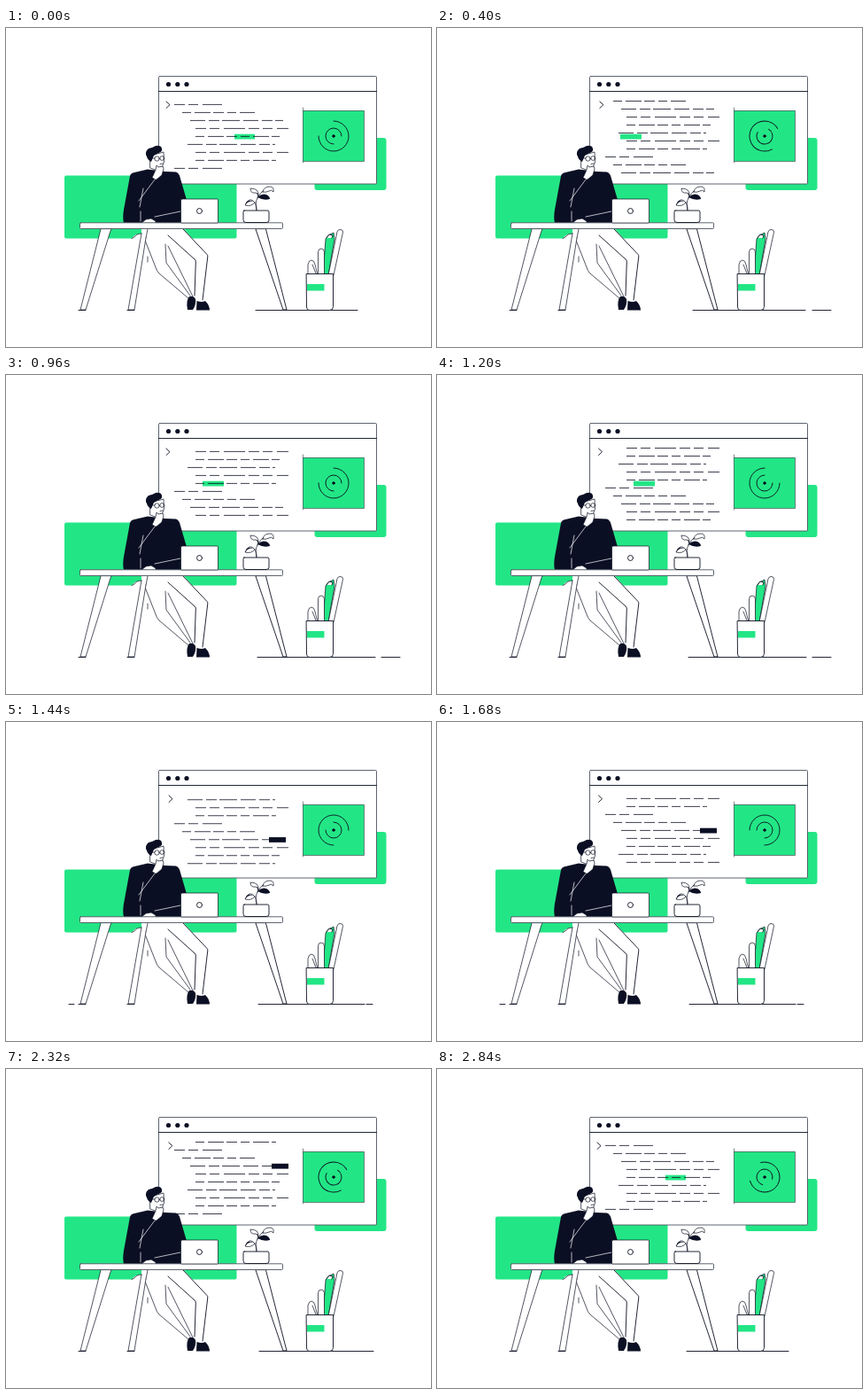
An HTML page that plays this animation: 480x360 px, repeating every 2.88 s.

```html
<!DOCTYPE html>
<html lang="en">
<head>
<meta charset="utf-8">
<title>Thinking at the desk</title>
<style>
  html, body { margin: 0; width: 100%; height: 100%; overflow: hidden; background: #fff; }
  svg { display: block; width: 100%; height: 100%; }
  .line { fill: none; stroke: #0b0f20; stroke-width: .9; stroke-linecap: round; stroke-linejoin: round; }
  .paper { fill: #fff; }
  .green { fill: #22e685; }
  .ink { fill: #0b0f24; }
  .thin { stroke-width: .7; }
  .soft { stroke: #4c5360; }
  .light { stroke: #fff; }
  #code { stroke-width: .8; stroke-linecap: butt; }
</style>
</head>
<body>
<svg viewBox="0 0 480 360">
  <clipPath id="page"><rect x="180" y="80" width="150" height="85"/></clipPath>

  <rect class="green" x="66" y="166.500" width="194.500" height="71" rx="2"/>
  <rect class="green" x="348.500" y="124" width="81" height="59" rx="3"/>

  <!-- Browser window -->
  <rect class="line paper soft" x="172.500" y="54.500" width="246" height="121.500" rx="1"/>
  <path class="line" d="M172.500 71.500h246"/>
  <g class="ink">
    <circle cx="183.500" cy="63.500" r="2.600"/>
    <circle cx="193.800" cy="63.500" r="2.600"/>
    <circle cx="204" cy="63.500" r="2.600"/>
  </g>
  <path id="chevron" class="line" d="M0 83l4 3.700-4 3.800"/>
  <g clip-path="url(#page)">
    <rect id="marker" height="5.800"/>
    <g id="code" class="line"></g>
  </g>

  <!-- Picture with turning arcs -->
  <rect class="green" x="335" y="93" width="69.500" height="57.500"/>
  <path class="line thin soft" d="M335.500 90v62M335.500 150.500h69V93.500h-69"/>
  <g class="line" transform="translate(370 122)">
    <path id="outerArc" d="M0-17A17 17 0 1 1-17 0"/>
    <path id="innerArc" d="M0-9A9 9 0 1 1-9 0"/>
    <circle class="ink" r="1.300"/>
  </g>

  <!-- Trousers and shoes -->
  <path class="paper" d="M142 238Q145 232 153 232V226H200L228 257 222 308H213L214 262 187 238H182L209 303 205 306 170 275 157 240Z"/>
  <path class="line" d="M200 227L227 255.500Q228 256.500 227.800 258L222 307M183 234L213 261Q214.500 262 214.300 264L213 302"/>
  <path class="line thin" d="M156 237L169 270Q170 274 173 277L206 305M180 244L181 265 208 302M183 246L211 303M160 258v6"/>
  <path class="ink" d="M207 303q5-1 7 3 1 6-3 12h-6q-2-10 2-15ZM215.500 308q6 2 9.500 0 5 5 5 10.500h-15Z"/>

  <!-- Table -->
  <path class="line paper thin" d="M107 227L84 318h6l28-89 1-2ZM158 237L145 318h-7L153 232"/>
  <path class="line thin" d="M158 237l2-10M153 232q-6 0-8 4l-3 1.500"/>
  <path class="line paper" d="M282 227l31 91h4L293.500 227Z"/>
  <path class="line" d="M82 318.500h8M137 318.500h8"/>
  <path id="ground" class="line"/>

  <!-- Man -->
  <path class="ink" d="M140 167Q141 163.500 145 163L160 159.500 180 162 192 162.500Q196 164 197 170L204 194 198 220H133Q131.500 214 133 205Z"/>
  <path class="line thin paper" d="M163 144L178 140 178.500 151 176 158 171 161 163 158Z"/>
  <path class="ink" d="M164 151q-4-2-5-6-3-5 2-9 5-1 8-3 6-1 7 3 1 4-4 5l-5 3Z"/>
  <g class="line thin">
    <circle cx="170.500" cy="147.500" r="2.700"/>
    <circle cx="176.200" cy="147" r="2.400"/>
    <path d="M164 147h4M174 153.500l3-.5"/>
    <path class="paper" d="M165 169l4-9 1-5 2 2 5-1 1 3-2 7-6 5Z"/>
  </g>
  <path class="line thin light" d="M171 167l-18 24-3 4M168 213l29-6M155 181l-4 21M152 207v11"/>
  <path class="line thin paper" d="M153 220l5-4 6-1 5 3v2Z"/>

  <rect class="line paper soft" x="83.500" y="219.800" width="229" height="6.700" rx="1"/>
  <rect class="line thin paper" x="197.500" y="193" width="42" height="27" rx="1"/>
  <circle class="line paper" cx="218.500" cy="206.500" r="3"/>

  <!-- Plant -->
  <path class="line thin" d="M283 206Q281 197 284 192 287 186 291 183M283 206Q284 197 277 195M284 192Q286 188 282 185"/>
  <path class="line thin paper" d="M285 189q1-8-9-8 0 6 6 5 3 0 3 3ZM290 185q1-6 8-6 5 0 4 6-2-3-5-1-4 2-7 1Z"/>
  <path class="line thin paper" d="M281 197q-6-8-11 3 7 2 11-3Z"/>
  <path class="ink" d="M284 191q5-5 10-3 4 2 4 5-7 2-14-2ZM280 196q-6-2-10 4 2-8 10-4Z"/>
  <path class="line paper" d="M269 206h27q1 0 1 2v9q0 2.500-3 2.500h-23q-3 0-3-3v-9q0-1.500 1-1.500Z"/>

  <!-- Pencil cup -->
  <path class="line thin green" d="M358 279l3-41 3-4 6-3 1 7-7 41Z"/>
  <path class="line paper" d="M362 237l3-4 4 1-1 3"/>
  <path class="line thin paper" d="M364 279l10-49q1-3 4-2.500t2.500 3L370 279Z"/>
  <path class="line thin paper" d="M352.500 279v-26q0-4 3.500-4t3.500 4v26Z"/>
  <path class="line thin paper" d="M341 279v-12q1-5 4-5t4 5l3 12Z"/>
  <path class="line thin" d="M346 267l4 10"/>
  <path class="line paper" d="M339.500 277.500h30v37q0 4-4 4h-22q-4 0-4-4Z"/>
  <rect class="green" x="340" y="289" width="19.500" height="7.500"/>
</svg>

<script>
const LOOP = 2880, TURN = 960, ROW = 9;
const FIRST_Y = 86.4, MARKER_Y = 119.7;
const byId = id => document.getElementById(id);
const code = byId('code'), marker = byId('marker');

// Left and right ends of the repeating code lines.
const rows = [[190, 244], [199, 281], [208, 313], [214, 319],
              [214, 309], [205, 304], [214, 319], [214, 305]];
const dashes = ['12 4 11 5 24 4', '10 4 18 3 12 4', '17 4 12 3 20 4'];

for (let i = 0; i < 20; i++) {
  const kind = i % rows.length, [left, right] = rows[kind];
  const line = document.createElementNS('http://www.w3.org/2000/svg', 'path');
  line.setAttribute('d', `M${left} ${FIRST_Y + i * ROW}H${right}`);
  line.setAttribute('stroke-dasharray', dashes[kind % dashes.length]);
  code.append(line);
}

// Middle of each one-row scroll.
const scrolls = [140, 408, 820, 1208, 1400, 1600, 1960, 2328];
const SCROLL_TIME = 160;

// start, x, width, rides on the text
const markers = [[0, 258, 23], [300, 207, 24], [600, 212, 12], [960, 222, 24],
                 [1440, 297, 19, true], [2000, 300, 19, true], [2480, 258, 23]];

const grounds = [[0, 'M282 318.500H397'], [200, 'M289 318.500H416M424 318.500h21'],
                 [560, 'M284 318.500H415'], [960, 'M284 318.500H417M424 318.500h21'],
                 [1440, 'M71 318.500h6M285 318.500H405M407 318.500h7'],
                 [2000, 'M286 318.500H415'], [2600, 'M282 318.500H397']];

const stateAt = (states, t) => states.findLast(([start]) => start <= t);

function smoothStep(t, middle) {
  const p = Math.min(1, Math.max(0, (t - middle) / SCROLL_TIME + .5));
  return p * p * (3 - 2 * p);
}

function draw(now) {
  const t = now % LOOP, turn = t / TURN, angle = turn * 360;
  const scroll = ROW * scrolls.reduce((sum, middle) => sum + smoothStep(t, middle), 0);
  code.setAttribute('transform', `translate(0 ${-scroll})`);

  const [, x, width, rides] = stateAt(markers, t);
  marker.setAttribute('x', x);
  marker.setAttribute('width', width);
  marker.setAttribute('y', MARKER_Y - (rides ? scroll - 6 * ROW : 0));
  marker.setAttribute('class', rides ? 'ink' : 'green');

  byId('ground').setAttribute('d', stateAt(grounds, t)[1]);
  byId('outerArc').setAttribute('transform', `rotate(${angle})`);
  byId('innerArc').setAttribute('transform', `rotate(${180 - angle})`);
  byId('chevron').setAttribute('transform',
    `translate(${182.5 - 1.5 * Math.cos(turn * 2 * Math.PI)})`);
}

const begin = performance.now();
function tick() {
  draw(performance.now() - begin);
  requestAnimationFrame(tick);
}
tick();
</script>
</body>
</html>
```
